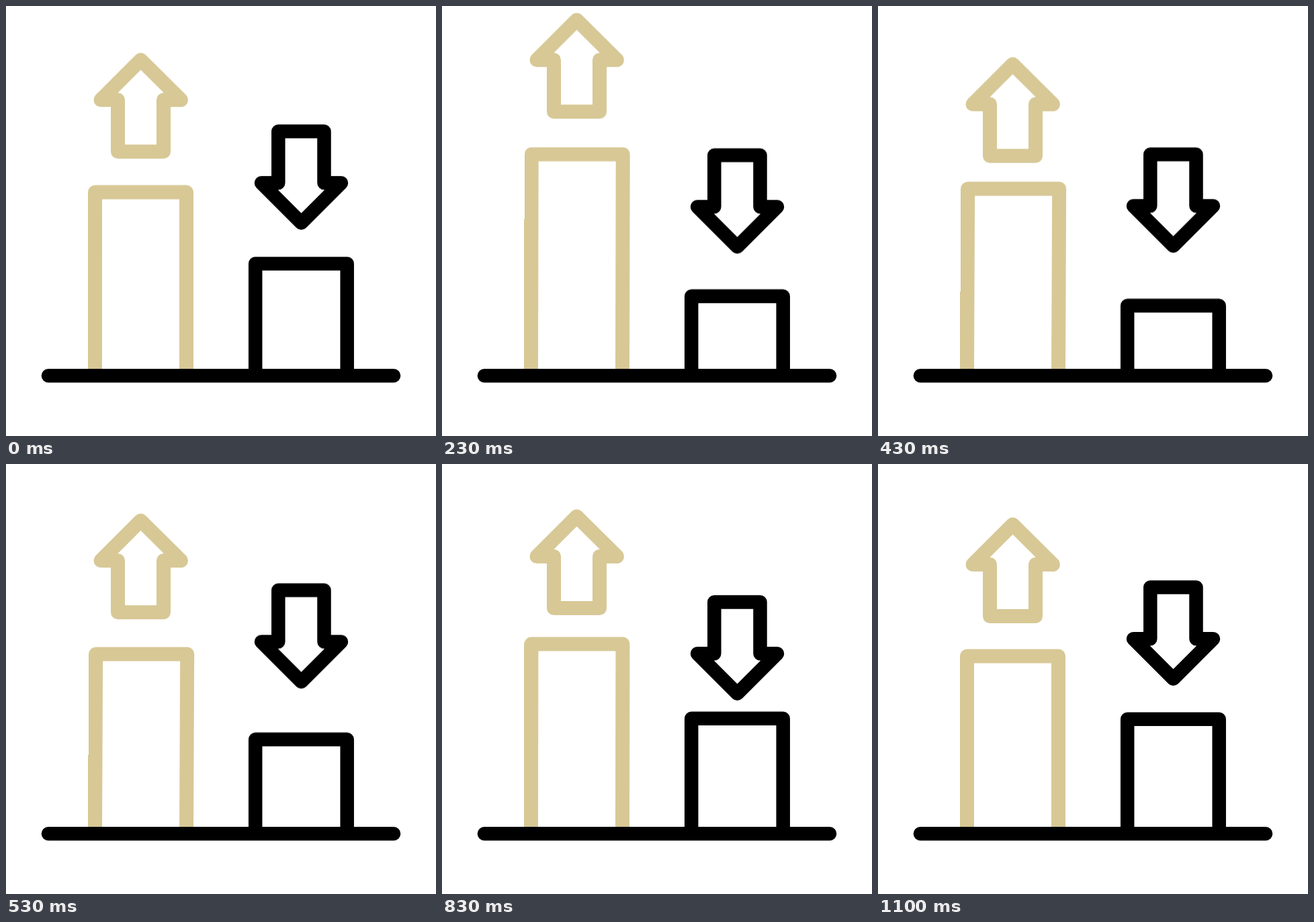
Recreate the animation shown at these times as an HTML page without scripts. Size 640 by 640 pixels, loop 1670 ms.

```html
<!DOCTYPE html>
<html lang="en">
<head>
<meta charset="utf-8">
<title>Rise and fall</title>
<style>
  html, body { margin: 0; height: 100%; overflow: hidden; background: #fff; }
  svg { display: block; width: 100vw; height: 100vh; }
  path { fill: none; stroke-linecap: round; stroke-linejoin: round; }
  .gold { stroke: #d7c896; stroke-width: 21; }
  .black { stroke: #000; stroke-width: 20.5; }

  .move { animation: 1670ms linear infinite; transform-origin: 0 550px; }
  .up-arrow { animation-name: up-arrow; }
  .up-bar { animation-name: up-bar; }
  .down-arrow { animation-name: down-arrow; }
  .down-bar { animation-name: down-bar; }

  @keyframes up-arrow {
    0% { transform: translateY(-9.5px); }
    6% { transform: translateY(-39.5px); animation-timing-function: cubic-bezier(.333, .51, .667, 1); }
    16% { transform: translateY(-71.3px); animation-timing-function: cubic-bezier(.333, 0, .5, 1); }
    28% { transform: translateY(0); animation-timing-function: cubic-bezier(.333, 0, .667, 1); }
    40% { transform: translateY(-24.5px); animation-timing-function: cubic-bezier(.333, 0, .62, 1); }
    60%, 100% { transform: translateY(0); }
  }
  @keyframes up-bar {
    0% { transform: skewX(0deg) translateY(-8.5px); }
    6% { transform: skewX(-.06deg) translateY(-36.5px); animation-timing-function: cubic-bezier(.333, .53, .667, 1); }
    18% { transform: skewX(-.14deg) translateY(-70.5px); animation-timing-function: cubic-bezier(.333, 0, .52, 1); }
    30% { transform: skewX(-.26deg) translateY(0); animation-timing-function: cubic-bezier(.333, 0, .667, 1); }
    40% { transform: skewX(-.18deg) translateY(-36px); animation-timing-function: cubic-bezier(.333, 0, .64, 1); }
    60%, 100% { transform: skewX(0deg) translateY(0); }
  }
  @keyframes down-arrow {
    0% { transform: translateY(3px); animation-timing-function: cubic-bezier(.333, .27, .667, .58); }
    6% { transform: translateY(14.5px); animation-timing-function: cubic-bezier(.333, .26, .667, .73); }
    14% { transform: translateY(39px); animation-timing-function: cubic-bezier(.333, .667, .667, 1); }
    22% { transform: translateY(49px); animation-timing-function: cubic-bezier(.333, 0, .667, 1); }
    34% { transform: translateY(0); animation-timing-function: cubic-bezier(.333, 0, .667, 1); }
    50% { transform: translateY(22px); animation-timing-function: cubic-bezier(.333, 0, .667, 1); }
    66%, 100% { transform: translateY(0); }
  }
  @keyframes down-bar {
    0% { transform: translateY(3.5px); animation-timing-function: cubic-bezier(.333, .27, .667, .58); }
    6% { transform: translateY(19.5px); animation-timing-function: cubic-bezier(.333, .27, .667, .675); }
    14% { transform: translateY(53px); animation-timing-function: cubic-bezier(.333, .52, .667, 1); }
    22% { transform: translateY(75.5px); animation-timing-function: cubic-bezier(.333, 0, .667, 1); }
    40% { transform: translateY(-4.5px); animation-timing-function: cubic-bezier(.333, 0, .667, 1); }
    54%, 100% { transform: translateY(0); }
  }
</style>
</head>
<body>
<svg viewBox="0 0 640 640">
  <clipPath id="ground"><path d="M0 0H640V550H0Z"/></clipPath>
  <g clip-path="url(#ground)">
    <path class="gold move up-bar" d="M132.5 700V286H268.5V700"/>
    <path class="black move down-bar" d="M371.2 700V379.8H507.7V700"/>
  </g>
  <path class="gold move up-arrow" d="M200.5 90L260.5 149.5H234.5V226.5H166.5V149.5H141Z"/>
  <path class="black move down-arrow" d="M439.5 319.8L499 260.2H473.5V183.4H405.3V260.2H380Z"/>
  <path class="black" d="M63 550.2H577"/>
</svg>
</body>
</html>
```
